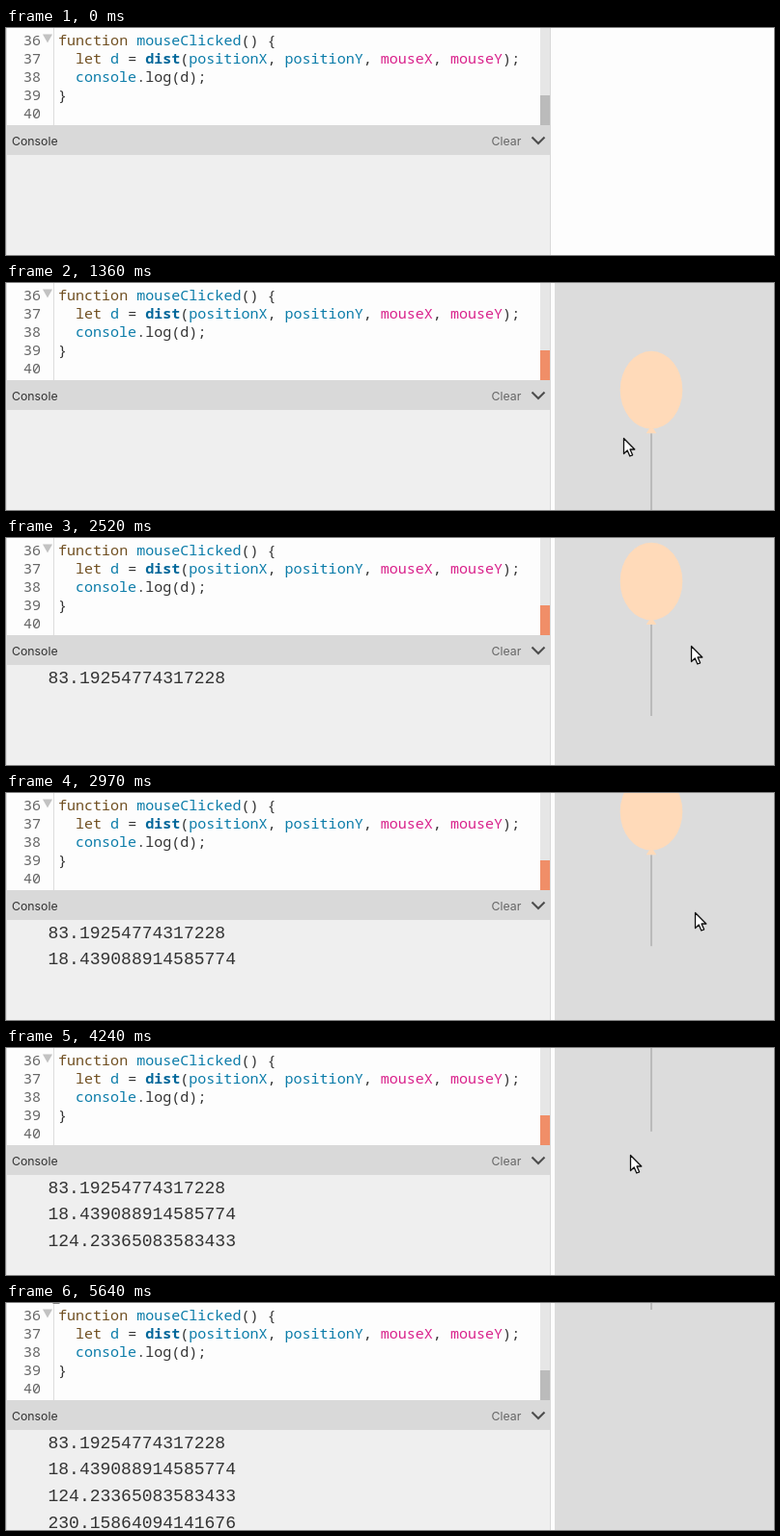
An HTML page for the animation above (5670 ms loop, 795x236 px).

```html
<!DOCTYPE html>
<html lang="en">
<head>
<meta charset="utf-8">
<title>Balloon sketch</title>
<style>
  html, body { margin: 0; width: 100%; height: 100%; overflow: hidden; background: #fdfdfd; }
  svg { display: block; }
  text { white-space: pre; fill: #333; }
  .code { font: 15.04px "Noto Sans Mono", monospace; }
  .log { font: 18px "Liberation Mono", monospace; }
  .ui { font: 12.3px Inter, sans-serif; }
  .keyword { fill: #704f21; }
  .name { fill: #0b7ca9; }
  .call { fill: #00679a; font-weight: bold; }
  .builtin { fill: #d9218b; }
  #numbers text { fill: #666; }
</style>
</head>
<body>
<svg width="795" height="236" viewBox="0 0 795 236">
  <rect width="795" height="236" fill="#fdfdfd"/>

  <g id="sketch">
    <rect x="568" width="227" height="236" fill="#dcdcdc"/>
    <g id="balloon" fill="#ffdab9">
      <path d="M0 45V140" stroke="#bababa" stroke-width="2"/>
      <ellipse rx="32.3" ry="40.3"/>
      <path d="M0 37L5.3 45H-5.3Z"/>
    </g>
  </g>

  <rect y="132" width="563" height="104" fill="#efefef"/>
  <path d="M.5 0V236M563.5 0V236" stroke="#d9d9d9"/>
  <path d="M49.5 0V101" stroke="#dddddd"/>
  <rect x="553" width="10" height="70" fill="#e6e6e6"/>
  <rect id="thumb" x="553" y="70" width="10" height="31"/>
  <rect y="101" width="564" height="31" fill="#d9d9d9"/>

  <g class="code" id="numbers"></g>
  <path d="M38 6.5H48L43 15.5Z" fill="#c2c2c2"/>
  <g class="code">
    <text x="54" y="17.5"><tspan class="keyword">function</tspan> <tspan class="name">mouseClicked</tspan>() {</text>
    <text x="72" y="36.5"><tspan class="keyword">let</tspan> <tspan class="name">d</tspan> = <tspan class="call">dist</tspan>(<tspan class="name">positionX</tspan>, <tspan class="name">positionY</tspan>, <tspan class="builtin">mouseX</tspan>, <tspan class="builtin">mouseY</tspan>);</text>
    <text x="72" y="55.5"><tspan class="name">console</tspan>.log(d);</text>
    <text x="54" y="74.5">}</text>
  </g>

  <g class="ui">
    <text x="6" y="122">Console</text>
    <text x="502.5" y="122" style="fill:#666">Clear</text>
  </g>
  <path d="M544.5 113.5L551 120L557.5 113.5" fill="none" stroke="#4d4d4d" stroke-width="2.1"/>
  <g class="log" id="logs"></g>

  <g id="cursor">
    <path id="arrow" d="M.5 .5V16.5L4.2 13L6.8 19L9.6 17.8L7 12H11.8Z" fill="#fff" stroke="#111" stroke-width="1.3" stroke-linejoin="round"/>
    <g id="beam" fill="none">
      <path d="M-3.5 -5.8H3.5M-3.5 5.8H3.5M0 -5.8V5.8" stroke="#fff" stroke-width="3"/>
      <path d="M-3.5 -5.8H3.5M-3.5 5.8H3.5M0 -5.8V5.8" stroke="#111" stroke-width="1.5"/>
    </g>
  </g>
</svg>
<script>
const LOOP = 5670;
const SKETCH_START = 940;
const RISE_SPEED = 0.05706;
const $ = id => document.getElementById(id);

// time, x, y of the pointer
const pointerPath = [
  [580, 366, 13], [760, 569, 115], [940, 569, 115],
  [1360, 639, 161], [1430, 635, 178], [1500, 635, 178],
  [2000, 680, 59], [2110, 680, 59],
  [2640, 713, 120], [2970, 713, 124], [3030, 713, 124], [3210, 717, 169],
  [3580, 628, 192], [3820, 628, 192],
  [4390, 650, 94], [4850, 419, 57], [4940, 267, 18],
  [5030, 267, 18], [5200, 52, -6]
];

const logLines = [
  [2000, 151, '83.19254774317228'],
  [2690, 178, '18.439088914585774'],
  [3580, 206, '124.23365083583433'],
  [4290, 234, '230.15864094141676']
];

const clamp = v => Math.min(1, Math.max(0, v));
const smooth = v => v * v * (3 - 2 * v);
const mix = (a, b, k) => a + (b - a) * k;
const show = (node, on) => node.setAttribute('visibility', on ? 'visible' : 'hidden');
const place = (node, x, y) => node.setAttribute('transform', `translate(${x} ${y})`);

function addText(parent, x, y, content) {
  const node = document.createElementNS('http://www.w3.org/2000/svg', 'text');
  node.setAttribute('x', x);
  node.setAttribute('y', y);
  node.textContent = content;
  return parent.appendChild(node);
}

for (let i = 0; i < 5; i++) addText($('numbers'), 18, 17.5 + 19 * i, 36 + i);
const logs = logLines.map(([time, y, value]) => ({ time, node: addText($('logs'), 43.5, y, value) }));

function pointerAt(t) {
  const next = pointerPath.findIndex(key => key[0] > t);
  if (next < 0) return pointerPath.at(-1).slice(1);
  const [t0, x0, y0] = pointerPath[Math.max(0, next - 1)];
  const [t1, x1, y1] = pointerPath[next];
  const k = smooth(clamp((t - t0) / (t1 - t0 || 1)));
  return [mix(x0, x1, k), mix(y0, y1, k)];
}

function thumbColor(t) {
  const k = clamp((t - 45) / 45) - clamp((t - 5200) / 60);
  const channel = (a, b) => Math.round(mix(a, b, k));
  return `rgb(${channel(187, 240)},${channel(187, 142)},${channel(187, 104)})`;
}

function render(t) {
  show($('sketch'), t >= SKETCH_START);
  place($('balloon'), 668, 73 - (t - 2030) * RISE_SPEED);
  $('thumb').setAttribute('fill', thumbColor(t));
  for (const { time, node } of logs) show(node, t >= time);

  const visible = t >= pointerPath[0][0];
  const [x, y] = pointerAt(t);
  const overCode = x < 553 && y < 101;
  place($('cursor'), Math.round(x), Math.round(y));
  show($('arrow'), visible && !overCode);
  show($('beam'), visible && overCode);
}

const start = performance.now();
function tick() {
  render((performance.now() - start) % LOOP);
  requestAnimationFrame(tick);
}
tick();
</script>
</body>
</html>
```
